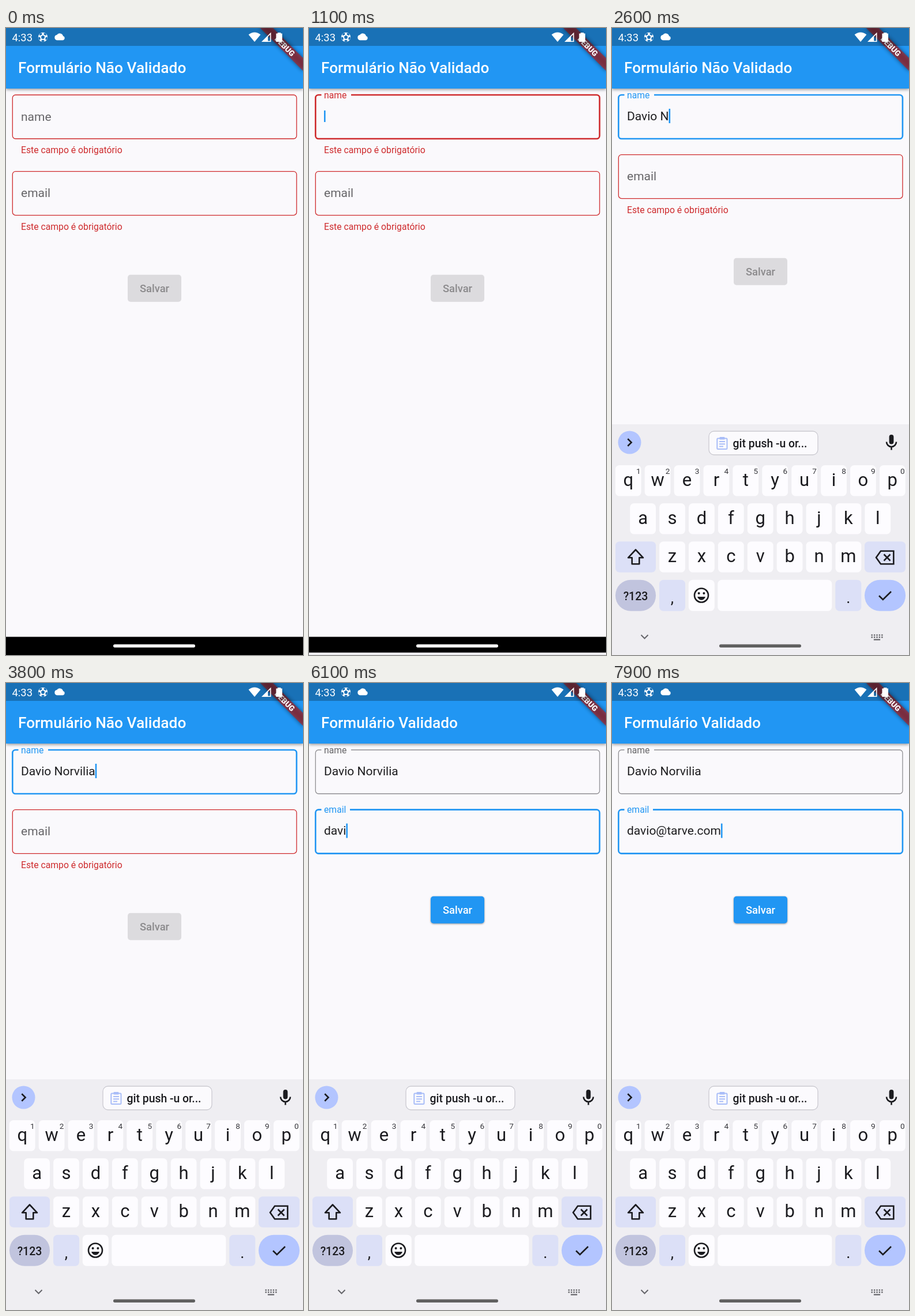
Write an HTML page that moves like this. It is 515 px wide and 1087 px high and loops after 8000 ms.

```html
<!DOCTYPE html>
<html lang="pt">
<head>
<meta charset="utf-8">
<title>Formulário</title>
<style>
  html, body { margin: 0; width: 100%; height: 100%; overflow: hidden; background: #faf9fc; }
  svg { display: block; width: 100vw; height: 100vh; }
  text { font-family: Roboto, sans-serif; white-space: pre; }
  .mid { text-anchor: middle; }
  .line { fill: none; stroke: #1b1b1f; stroke-width: 2.6; }
</style>
</head>
<body>
<svg id="stage" viewBox="0 0 515 1087" xmlns="http://www.w3.org/2000/svg"></svg>
<script>
const LOOP = 8000, STEP = 100, FADE = 167;
const RED = [206, 43, 45], BLUE = [33, 150, 243], GREY = [102, 101, 104], LINE = [143, 142, 146];
const NAME_FOCUS = 858, NAME_TYPE = 1600, NAME_VALID = 2050;
const MAIL_FOCUS = 4780, MAIL_TYPE = 5600;
const KEYS_UP = 1080, ROW = 29;

const stage = document.getElementById('stage');
const $ = id => document.getElementById(id);
const set = (el, attrs) => { for (const k in attrs) el.setAttribute(k, attrs[k]); };
const clamp = v => Math.min(1, Math.max(0, v));
const lerp = (a, b, p) => a + (b - a) * p;
const mix = (a, b, p) => a.map((v, i) => lerp(v, b[i], p));
const rgb = c => `rgb(${c.map(Math.round)})`;

// cubic-bezier(.4, 0, .2, 1)
function ease(x) {
  if (x <= 0 || x >= 1) return clamp(x);
  let lo = 0, hi = 1, s;
  for (let i = 0; i < 24; i++) {
    s = (lo + hi) / 2;
    const at = 1.2 * (1 - s) ** 2 * s + 0.6 * (1 - s) * s * s + s ** 3;
    if (at < x) lo = s; else hi = s;
  }
  return 3 * (1 - s) * s * s + s ** 3;
}
const ramp = (t, from, span = FADE) => ease(clamp((t - from) / span));

// Blends through [time, colour] stops, each taking FADE ms
const tint = (t, stops) =>
  rgb(stops.reduce((c, [at, next]) => c ? mix(c, next, ramp(t, at)) : next, null));

const rect = (x, y, w, h, r, fill, more = '') =>
  `<rect x="${x}" y="${y}" width="${w}" height="${h}" rx="${r}" fill="${fill}" ${more}/>`;
const text = (x, y, size, str, fill, more = '') =>
  `<text x="${x}" y="${y}" font-size="${size}" fill="${fill}" ${more}>${str}</text>`;
const line = (d, more = '') => `<path class="line" d="${d}" ${more}/>`;

function statusIcons() {
  const patches = [0, 1, 2, 3, 4].map(i =>
    `<path d="M0-8.2L3-6.9L1.6-4.8H-1.6L-3-6.9Z" transform="rotate(${i * 72 + 36})"/>`).join('');
  return text(10.5, 22.7, 18.4, '4:33', '#fff') +
    `<g transform="translate(64 16)"><circle r="8.2" fill="#fff"/>
      <g fill="#1970b6"><path d="M0-3.4L3.2-1L2 2.8H-2L-3.2-1Z"/>${patches}</g></g>
    <path fill="#fff" d="M88.5 21.2a4.6 4.6 0 0 1-.4-9.1a6 6 0 0 1 10.9 1.9a3.7 3.7 0 0 1-.4 7.2z"/>
    <path fill="#fff" d="M431 24L420.6 11.4Q431 3.6 441.4 11.4Z"/>
    <path fill="#fff" fill-rule="evenodd" d="M443 24L459.5 7.5V24ZM454.2 22.4H457.9V11.4L454.2 15.1Z"/>
    <path fill="#fff" d="M471 9.6V8H476.4V9.6H479V24H468.4V9.6Z"/>`;
}

function keyboard() {
  const white = '#fdfcff', pale = '#dce0f7', ink = '#1b1b1f', pitch = 50.9;
  const key = (cx, y, ch) => rect(cx - 22.4, y, 44.8, 53.5, 7, white) +
    text(cx, y + 36, 31, ch, ink, 'class="mid"');
  const row = (chars, x, y) => [...chars].map((ch, i) => key(x + i * pitch, y, ch)).join('');
  const digits = [...'1234567890'].map((d, i) =>
    text(45.7 + i * pitch, 773, 13.6, d, '#35353a', 'class="mid"')).join('');
  const dots = [1051.3, 1055].map(y => [0, 1, 2, 3, 4].map(i =>
    rect(449.5 + i * 4.4, y, 2.4, 2.4, 0, '#66666b')).join('')).join('');

  return rect(0, 687, 515, 400, 0, '#efeef2') +
    '<circle cx="30.5" cy="718.5" r="20" fill="#b3c5ff"/>' + line('M27.3 712.3L33.6 718.5L27.3 724.7') +
    rect(168, 699, 189, 41, 9, '#fbfafd', 'stroke="#cbcad1" stroke-width="1.3"') +
    `<g fill="none" stroke="#a9bdf8" stroke-width="2">${rect(182.3, 711.5, 17.2, 18.5, 1.5, 'none')}
      <path d="M186 717H196M186 721.3H196M186 725.5H193"/></g>` +
    rect(186.5, 709, 9, 4.5, 1, '#a9bdf8') +
    text(209.5, 726.8, 19.4, 'git push -u or...', ink, 'font-weight="500"') +
    rect(480.6, 705, 7.8, 16.5, 3.9, ink) + line('M476 717.5a8.5 8.5 0 0 0 17 0M484.5 726V731.5') +
    row('qwertyuiop', 28.2, 758) + digits +
    row('asdfghjkl', 53.6, 824) + row('zxcvbnm', 104.5, 890.3) +
    rect(6, 890.3, 70, 53.5, 7, pale) +
    line('M41 904.5L54 918.3H47.3V929.3H34.7V918.3H28Z', 'stroke-linejoin="round"') +
    rect(438, 890.3, 71, 53.5, 7, pale) +
    line('M458 918L466 906.7H488.3V929.3H466ZM471.5 912.5L482.5 923.5M482.5 912.5L471.5 923.5') +
    rect(6, 956.8, 70, 54, 26.5, '#c1c4de') + text(41, 991.5, 19.5, '?123', ink, 'class="mid" font-weight="500"') +
    rect(82, 956.8, 45, 54, 7, pale) + text(104.5, 997, 27, ',', ink, 'class="mid"') +
    rect(132.8, 956.8, 45, 54, 7, white) +
    '<circle class="line" cx="155" cy="983.5" r="12"/>' +
    `<g fill="${ink}"><circle cx="150.6" cy="980" r="2"/><circle cx="159.4" cy="980" r="2"/>
      <path d="M148 986H162Q160 991.7 155 991.7T148 986Z"/></g>` +
    rect(183.3, 956.8, 198, 54, 7, white) +
    rect(387.3, 956.8, 45, 54, 7, pale) + text(409.8, 997, 27, '.', ink, 'class="mid"') +
    rect(438, 956.8, 71, 54, 26.5, '#b3c5ff') + line('M463 984.3L469.8 991L484 977') +
    line('M50.5 1052.3L56.5 1058.3L62.5 1052.3', 'style="stroke:#66666b;stroke-width:2"') +
    dots + rect(453.9, 1059.3, 11.2, 2.2, 0, '#66666b');
}

const field = (id, label) => `<g id="${id}">
  <path id="${id}Box" fill="none"/>
  ${text(26, 0, 21, label, '#666', `id="${id}Label"`)}
  ${text(26, 43.8, 21, '', '#1d1d1f', `id="${id}Text"`)}
  ${rect(26, 24, 2.6, 25, 0, '#2196f3', `id="${id}Caret"`)}
  ${rect(26, 46, 0, 1.4, 0, '#1d1d1f', `id="${id}Under"`)}
  ${text(26, 101.3, 15.75, 'Este campo é obrigatório', '#ce2b2d', `id="${id}Error"`)}</g>`;

stage.innerHTML = rect(0, 0, 515, 1087, 0, '#faf9fc') +
  field('name', 'name') + field('mail', 'email') +
  `<g id="save">${rect(211, 0, 93, 47, 5, '#000', 'id="saveBox"')}
    ${text(257.5, 30.3, 18.4, 'Salvar', '#000', 'id="saveText" class="mid" font-weight="500"')}</g>` +
  rect(0, -10, 515, 115, 0, '#2196f3', 'style="filter:drop-shadow(0 2.5px 2.5px rgba(0,0,0,.38))"') +
  text(21, 78.3, 26.25, '', '#fff', 'id="title" font-weight="500"') +
  `<g transform="translate(515 0) rotate(45)">
    ${rect(-52.5, 36.75, 105, 15.75, 0, '#000', 'opacity=".5" style="filter:blur(3.5px)"')}
    ${rect(-52.5, 36.75, 105, 15.75, 0, '#b71c1c', 'opacity=".63"')}
    ${text(0, 49.4, 13.4, 'DEBUG', '#fff', 'class="mid" font-weight="900"')}</g>` +
  rect(0, 0, 515, 31, 0, '#000', 'opacity=".25"') + statusIcons() +
  rect(0, 1055.5, 515, 32, 0, '#000') +
  `<g id="keys">${keyboard()}</g>` + rect(186, 1068.5, 142, 5.4, 2.7, '#fff', 'id="pill"');

// Outline drawn clockwise, leaving a gap for the floated label
function outline(gap) {
  const l = 11.3, r = 503.9, b = 76, c = 5.25, start = 21.5;
  return `M${start + gap} 0H${r - c}a${c} ${c} 0 0 1 ${c} ${c}V${b - c}a${c} ${c} 0 0 1 ${-c} ${c}` +
    `H${l + c}a${c} ${c} 0 0 1 ${-c} ${-c}V${c}a${c} ${c} 0 0 1 ${c} ${-c}H${start}${gap ? '' : 'Z'}`;
}

function drawField(t, f) {
  const part = name => $(f.id + name);
  const p = ramp(t, f.focus);
  const size = lerp(21, 15.75, p);
  const shown = t < f.type ? 0 : Math.min(f.value.length, 1 + Math.floor((t - f.type) / f.pace));

  set($(f.id), { transform: `translate(0 ${f.y})` });
  set(part('Label'), { 'font-size': size, y: lerp(44.5, 5.6, p), fill: tint(t, f.label) });
  set(part('Box'), {
    d: outline(p * f.gap),
    stroke: tint(t, f.border),
    'stroke-width': lerp(1.3, 2.6, p - ramp(t, f.blur))
  });
  part('Text').textContent = f.value.slice(0, shown);

  const width = shown ? part('Text').getComputedTextLength() : 0;
  const lastEdit = shown ? f.type + (shown - 1) * f.pace : f.focus;
  const on = t >= f.focus && t < f.blur && (t - lastEdit) % 1000 < 500;
  set(part('Caret'), {
    x: 26 + width, y: shown ? 24 : 27, height: shown ? 25 : 20, opacity: on ? 1 : 0
  });
  set(part('Under'), { width: shown === 1 && f.composing ? width : 0 });
  set(part('Error'), { opacity: 1 - clamp((t - f.valid) / FADE) });
}

function draw(t) {
  const nameGone = t >= NAME_VALID + FADE ? ROW : 0;
  const mailGone = t >= MAIL_TYPE + FADE ? ROW : 0;
  const valid = t >= MAIL_TYPE;

  drawField(t, {
    id: 'name', y: 116, value: 'Davio Norvilia', gap: 51.5, composing: true,
    focus: NAME_FOCUS, blur: MAIL_FOCUS, type: NAME_TYPE, pace: 150, valid: NAME_VALID,
    label: [[0, GREY], [NAME_FOCUS, RED], [NAME_VALID, BLUE], [MAIL_FOCUS, GREY]],
    border: [[0, RED], [NAME_VALID, BLUE], [MAIL_FOCUS, LINE]]
  });
  $('nameError').textContent = t < NAME_TYPE
    ? 'Este campo é obrigatório' : 'Seu nome precisa ter mais de 3 caracteres';

  drawField(t, {
    id: 'mail', y: 248.6 - nameGone, value: 'davio@tarve.com', gap: 49.5,
    focus: MAIL_FOCUS, blur: LOOP, type: MAIL_TYPE, pace: 160, valid: MAIL_TYPE,
    label: [[0, GREY], [MAIL_FOCUS, RED], [MAIL_TYPE, BLUE]],
    border: [[0, RED], [MAIL_TYPE, BLUE]]
  });

  $('title').textContent = valid ? 'Formulário Validado' : 'Formulário Não Validado';
  set($('save'), { transform: `translate(0 ${427.8 - nameGone - mailGone})` });
  set($('saveBox'), {
    fill: tint(t, [[0, [220, 219, 222]], [MAIL_TYPE, BLUE]]),
    style: valid ? 'filter:drop-shadow(0 1.5px 1.5px rgba(0,0,0,.4))' : ''
  });
  set($('saveText'), { fill: tint(t, [[0, [139, 138, 140]], [MAIL_TYPE, [255, 255, 255]]]) });

  set($('keys'), { transform: `translate(0 ${400 * (1 - ramp(t, KEYS_UP, 300))})` });
  const shade = lerp(255, 96, clamp((t - 1500) / 365));
  set($('pill'), { fill: rgb([shade, shade, shade]) });
}

const start = performance.now();
function tick() {
  const t = (performance.now() - start) % LOOP;
  draw(Math.floor(t / STEP) * STEP);
  requestAnimationFrame(tick);
}
tick();
</script>
</body>
</html>
```
